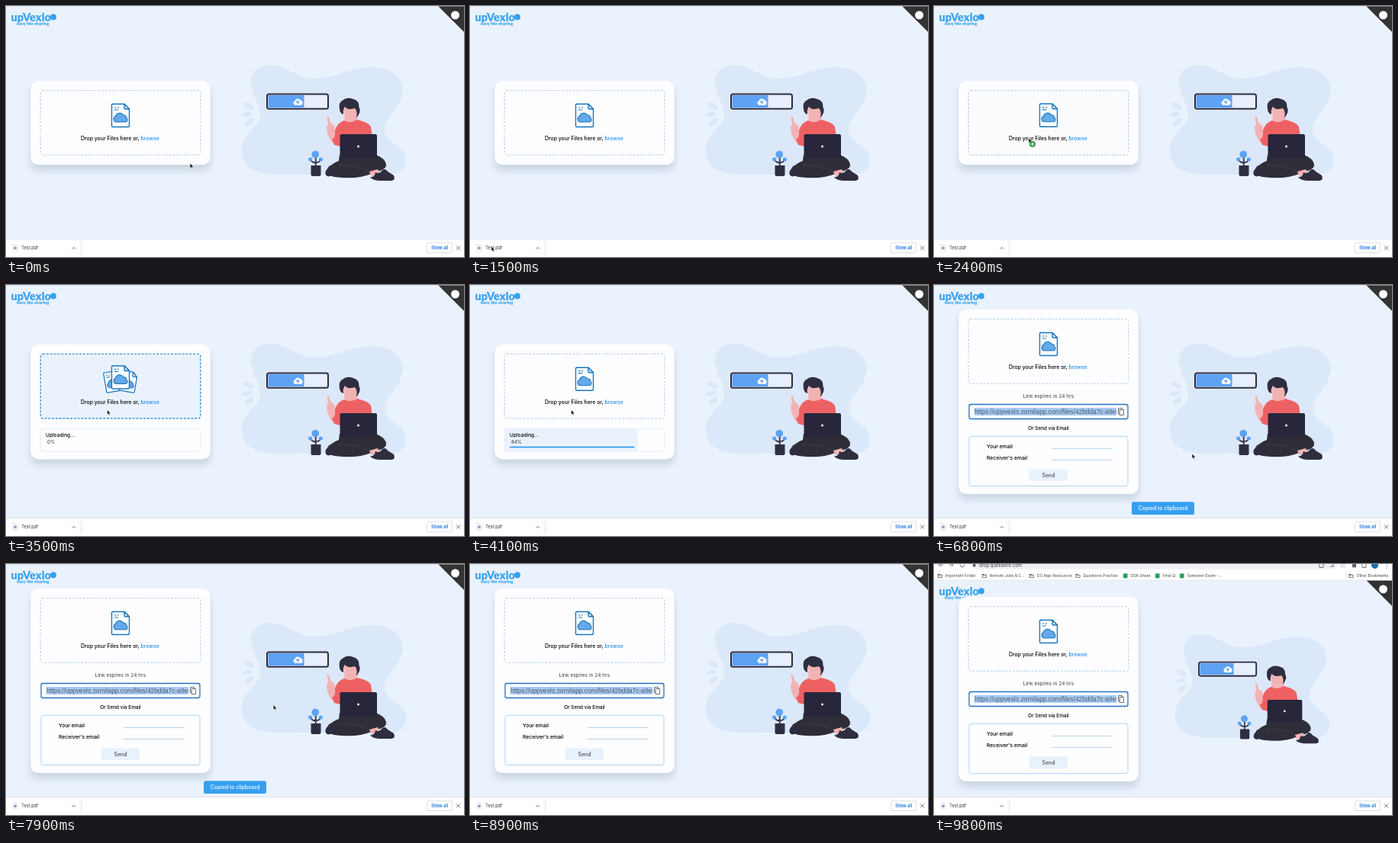
These frames come from a looping animation (600 by 329 pixels, 9.9 s). An HTML page:

```html
<!DOCTYPE html>
<html lang="en">
<head>
<meta charset="utf-8">
<title>File sharing demo</title>
<style>
  html, body { margin: 0; width: 100%; height: 100%; overflow: hidden; background: #eaf2fd; }
  svg { display: block; width: 600px; height: 329px; font: 6.9px Inter, sans-serif; }
  .mid { text-anchor: middle; }
  .strong { font-weight: 500; }
  .line { fill: none; stroke-linecap: round; stroke-linejoin: round; }
  .blue { fill: #1f8fec; }
  .logo { fill: #38a2ee; font-family: Lato, sans-serif; font-weight: 900; }
  .dark { fill: #2f2e41; }
  .skin { fill: #f3b3b4; }
  .pale { fill: #dbe8fa; }
  .arial { font-family: "Liberation Sans", Arial, sans-serif; }
</style>
</head>
<body>
<svg viewBox="0 0 600 329">
  <defs>
    <filter id="shadow" x="-20%" y="-20%" width="140%" height="150%">
      <feDropShadow dx="0" dy="7.500" stdDeviation="4.500" flood-color="#1c2a40" flood-opacity=".14"/>
    </filter>
    <clipPath id="page"><rect width="600" height="305.5"/></clipPath>
    <clipPath id="linkClip"><rect x="50" y="120" width="189.3" height="30"/></clipPath>
    <g id="paper" stroke="#1976c0" stroke-width="1.4" stroke-linejoin="round">
      <path fill="#fff" d="M-11-15H5L11.5-8.5V13.5Q11.500 15 10 15H-10Q-11.500 15-11.500 13.500V-13.500Q-11.500-15-10-15Z"/>
      <path fill="#d8eafb" d="M5-15V-9.500Q5-8.500 6-8.500H11.500Z"/>
      <path fill="none" stroke-width="1.200" d="M-8-10.500H-5.500M-4-10.500H-2M-8-7.500H-3"/>
      <path fill="#64a9e9" stroke-width="1.100" d="M-6 8.500A4 4 0 0 1-6.500 1A5.500 5.500 0 0 1 3.500-.5A4.200 4.200 0 0 1 8 3.500A2.800 2.800 0 0 1 6.500 8.500Z"/>
    </g>
    <g id="folder"><path fill="#5f6368" d="M-3-2.500H-.5L.5-1.500H3V2.500H-3Z"/><path fill="#fff" d="M-2.200-.7H2.200V1.700H-2.200Z"/></g>
  </defs>

  <rect width="600" height="329" fill="#eaf2fd"/>
  <g clip-path="url(#page)">
    <g id="art">
      <path class="pale" d="M321 99C320 86 333 76 347 77C368 78 380 94 402 95C428 96 452 80 480 80C507 80 523 97 519 116C515 137 497 143 496 161C496 182 524 181 524 202C524 217 511 223 490 223L400 221C372 220 350 224 329 217C311 211 306 195 310 181C315 163 332 159 333 143C333 127 322 118 321 99Z"/>
      <g class="pale">
        <ellipse cx="318" cy="131" rx="8" ry="3.500" transform="rotate(28 318 131)"/>
        <ellipse cx="316" cy="142" rx="7" ry="3" transform="rotate(-6 316 142)"/>
        <ellipse cx="319" cy="152" rx="7" ry="3.500" transform="rotate(-38 319 152)"/>
      </g>
      <rect x="342" y="115.500" width="80" height="19.300" rx="2.500" fill="#e6effb" stroke="#2f2e41" stroke-width="2"/>
      <path fill="#5da2f3" d="M343.500 117H390.500V133.300H343.500Z"/>
      <path fill="#fff" d="M379 130A3 3 0 0 1 378.500 124.200A4 4 0 0 1 385.800 123.500A3.300 3.300 0 0 1 386 130Z"/>
      <path class="line" stroke="#5da2f3" stroke-width="1.200" d="M382.300 128.500V124.500M380.700 126L382.300 124.400L383.900 126"/>

      <path class="dark" d="M399.500 209H412.500V221Q412.500 223 410.500 223H401.500Q399.500 223 399.500 221Z"/>
      <path class="line" stroke="#2f2e41" stroke-width="1.800" d="M405.700 210V196M399 201Q400 205 405.700 205.500Q411 205 412.300 201"/>
      <g fill="#5da2f3"><circle cx="405.300" cy="194.500" r="4.800"/><circle cx="398.700" cy="201" r="2.600"/><circle cx="412.300" cy="201" r="2.600"/></g>

      <path class="skin" d="M420.500 146Q422 143 423.500 147L426 154Q431 155 431 161L434 176L427 179Q420 169 420 159L422 154Z"/>
      <path class="skin" d="M443 140H461L459 156H444Z"/>
      <path fill="#ee6163" d="M443 150Q452 155 460 149Q474 152 478 158L481 178L476 199H439L438 184L430 182L427 175Q432 173 431 163Q434 153 443 150Z"/>
      <path class="skin" d="M442.500 134Q443 150 452 151Q461 150 461 136L456 130Z"/>
      <path class="dark" d="M437 136Q435 126 442 123Q447 119 455 122Q463 124 462.500 133Q465 137 462 142Q460 146 459 146Q461 138 457 134Q448 137 443.500 132Q441 137 442 142Q438 141 437 136Z"/>
      <path fill="#2f2e38" d="M437 195H484Q496 199 498 207Q499 213 490 216L478 220Q460 228 430 224Q421 222 422 214Q425 207 436 203Z"/>
      <path class="line" stroke="#44434f" stroke-width=".7" d="M436 209Q458 207 478 218"/>
      <path class="skin" d="M476 217L487 214Q491 218 486 224L478 222Z"/>
      <path class="dark" d="M484 218Q489 221 493 215Q497 212 500 217L508 222Q511 229 504 229H488Q479 228 477 224Q483 225 484 218ZM424 209Q431 212 430 222L422 223.500Q417 222 419 216Z"/>
      <rect x="437.500" y="168" width="48.500" height="31.500" rx="2" fill="#27263a"/>
      <circle cx="461.500" cy="184" r="1.500" fill="#eef2fb"/>
    </g>

    <g id="head">
      <text class="logo" x="6.500" y="19.500" font-size="14.500">upVexlo</text>
      <circle fill="#38a2ee" cx="62" cy="14.500" r="4"/>
      <text class="logo" x="14" y="24.600" font-size="5.900">easy file sharing</text>
      <path fill="#333" d="M566 0H600V34Z"/>
      <circle cx="588.500" cy="12" r="5.500" fill="#fff"/>
    </g>

    <g id="card">
      <rect id="panel" x="32.500" width="235" rx="10" fill="#fefdff" filter="url(#shadow)"/>
      <rect id="zone" x="45.200" y="12.800" width="209.600" height="84.400" rx="3" stroke-dasharray="3 1.800"/>
      <use id="left" href="#paper"/><use id="right" href="#paper"/><use id="front" href="#paper"/>
      <text class="strong" x="98" y="78.300">Drop your Files here or, <tspan class="blue">browse</tspan></text>

      <g id="progress">
        <rect x="45.200" y="110.500" width="209.600" height="30" rx="3" fill="#fefdff" stroke="#e1edfa"/>
        <rect id="tint" x="45.500" y="111" height="29" fill="#eaf3fd"/>
        <text class="strong" x="52" y="121.300" font-size="6.600">Uploading...</text>
        <text id="percent" x="54" y="130.500" font-size="6.200" fill="#333"></text>
        <rect id="bar" class="blue" x="52" y="134" height="1.500" rx=".7"/>
      </g>

      <g id="share">
        <text class="mid" x="150" y="116.300" font-size="6.600" fill="#3c4046">Link expires in 24 hrs</text>
        <rect id="linkBox" x="46" y="124.500" width="208" height="19" rx="2.500"/>
        <rect id="selection" x="53" y="129" width="186" height="10" fill="#a6cbf5"/>
        <text class="arial" x="53" y="136.700" font-size="8.330" fill="#555b63" clip-path="url(#linkClip)">https://uppvexlo.zornilapp.com/files/42bdda7c-a9ed86</text>
        <path class="line" stroke="#4a4f56" stroke-width=".8" d="M243.500 131.500H248.500V138.500H243.500ZM243 136.500H241.500V129.500H246.500V131"/>
        <text class="mid strong" x="150" y="158.200" font-size="6.400">Or Send via Email</text>
        <rect x="46" y="166.300" width="208" height="65.200" rx="3" fill="#fefdff" stroke="#add5f4"/>
        <text class="strong" x="69" y="182.200" font-size="6.800">Your email</text>
        <text class="strong" x="69" y="197.200" font-size="6.800">Receiver's email</text>
        <path stroke="#a6cfee" stroke-width=".8" d="M154 182.500H233.500M154 197.500H233.500"/>
        <rect x="124.500" y="209.500" width="50.500" height="15.500" rx="2" fill="#e9f2fc"/>
        <text class="mid strong" x="150" y="219.700" font-size="7" fill="#48525e">Send</text>
      </g>
    </g>

    <g id="toast">
      <rect x="259" y="284.300" width="82" height="16.700" rx="2.500" fill="#369ff1"/>
      <text class="mid strong" x="300" y="295.200" fill="#fff">Copied to clipboard</text>
    </g>
  </g>

  <path id="topLine" d="M0 .3H600" stroke="#cbd3dd" stroke-width=".6"/>
  <g id="chrome" font-size="5.100" fill="#3c4043">
    <path fill="#fff" d="M0-2H600V21.500H0Z"/>
    <rect x="48" y="-10" width="481" height="17" rx="8" fill="#eff1f4"/>
    <path stroke="#d9dce0" stroke-width=".6" d="M0 21.300H600M540.500 11V19"/>
    <path fill="#5f6368" d="M51 0H54.500V3.500H51ZM548 0H553V4.500H548Z"/>
    <text x="59" y="3.700" font-size="6">drop.quellavint.com</text>
    <g class="line" stroke="#5f6368" stroke-width=".9">
      <path d="M6.500 1H11.500M6.500 1L9 3.500M20.500 1H25.500L23 3.500M34 1Q34.500 4 37 4Q39.500 4 40 1.500M505 0V4.500H510V0M519 4L521 2.500L523 4V0M593 0V.5M593 2.500V3M593 5V5.300M561 0V4.500H566V0"/>
    </g>
    <rect x="532" y="-1" width="7" height="6" fill="#e4e6e9"/>
    <circle cx="577.500" cy="1.500" r="4.500" fill="#1b6fa8"/>
    <g id="marks"></g>
  </g>

  <g>
    <path fill="#fff" d="M0 305.500H600V329H0Z"/>
    <path stroke="#d9dde2" stroke-width=".8" d="M0 305.500H600M98.500 309V326"/>
    <path fill="#f1f3f5" stroke="#d5d8dc" stroke-width=".5" d="M9 313H13L15 315V321H9Z"/>
    <circle cx="12" cy="317.300" r="1.800" fill="#7c9cc8"/>
    <text x="20.300" y="319.400" font-size="5.600" fill="#333">Test.pdf</text>
    <path class="line" stroke="#5f6368" stroke-width=".9" d="M86.800 318.300L88.800 316.300L90.800 318.300M590.300 314.800L594.700 319.200M594.700 314.800L590.300 319.200"/>
    <rect x="551.500" y="310.500" width="33" height="13" rx="1.500" fill="#fff" stroke="#d6dbe3" stroke-width=".8"/>
    <text class="mid" x="568" y="319.200" font-size="5.500" font-weight="600" fill="#1a73e8">Show all</text>
  </g>

  <g id="cursor">
    <path id="arrow" fill="#111" stroke="#fff" stroke-width=".6" d="M0 0V6.500L1.500 5.200L2.600 7.500L3.700 7L2.700 4.800H4.700Z"/>
    <path id="hand" fill="#fff" stroke="#222" stroke-width=".7" d="M-.8 0Q0-.8 .8 0V2.500L4 3.200V6Q3.500 8 1.500 8Q-1 8-2.500 4.500L-.8 5Z"/>
    <g id="badge"><circle cx="5" cy="8" r="4" fill="#2f9e3f"/><path stroke="#fff" stroke-width="1.200" d="M2.800 8H7.200M5 5.800V10.200"/></g>
  </g>
</svg>
<script>
const LOOP = 9900;
const DROP = 3480, SHARED = 4300, COPIED = 6050;
const $ = id => document.getElementById(id);
const set = (id, attrs) => { for (const k in attrs) $(id).setAttribute(k, attrs[k]); };
const show = (id, on) => $(id).style.display = on ? '' : 'none';
const mix = (a, b, p) => a + (b - a) * p;
const ease = p => p * p * (3 - 2 * p);
const ramp = (t, from, to) => Math.min(1, Math.max(0, (t - from) / (to - from)));
const blend = (a, b, p) => `rgb(${a.map((v, i) => Math.round(mix(v, b[i], p)))})`;

// time, x, y of the pointer tip
const route = [
  [0, 241, 206], [100, 241, 206], [400, 226, 222], [700, 226, 222], [1400, 28, 315], [1700, 28, 315],
  [2400, 124, 173], [2800, 132.5, 163.5], [4600, 132.5, 163.5], [5400, 249, 163],
  [6150, 249, 163], [6800, 338, 221], [7700, 338, 221], [8500, 415, -10], [LOOP, 415, -10]
];

function pointerAt(t) {
  const i = route.findIndex(k => k[0] > t), a = route[i - 1], b = route[i];
  const p = ease(ramp(t, a[0], b[0]));
  return [mix(a[1], b[1], p), mix(a[2], b[2], p)];
}

const bookmarks = [
  [8, 'Important Folder'], [66, 'Remote Jobs & C...'], [128, 'DS Algo Resources'], [188.5, 'Questions Practise'],
  [250.5, 'DSA Sheet', 1], [292.5, 'Final Q', 1], [324.5, 'Semester Exam -...', 1], [546.5, 'Other Bookmarks']
];
$('marks').innerHTML = bookmarks.map(([x, label, sheet]) =>
  (sheet ? `<rect x="${x - 2.5}" y="12.5" width="5.5" height="6" fill="#2a9d58"/>` : `<use href="#folder" x="${x}" y="15.5"/>`) +
  `<text x="${x + 7}" y="17.3">${label.replace('&', '&amp;')}</text>`).join('');

function draw(t) {
  const reveal = ease(ramp(t, 9400, 9600));
  const hover = ease(ramp(t, 2360, 2580)) * (1 - ease(ramp(t, DROP, DROP + 220)));
  const shared = t >= SHARED, uploading = t >= DROP && !shared, copied = t >= COPIED;

  const [top, height] = shared ? [32, 242] : uploading ? [77.7, 150.5] : [98, 110];
  set('card', { transform: `translate(0 ${top + 11 * reveal})` });
  set('panel', { height });
  set('zone', {
    fill: blend([254, 253, 255], [232, 242, 253], hover),
    stroke: blend([165, 205, 235], [25, 130, 215], hover),
    'stroke-width': mix(.9, 1.2, hover)
  });
  set('front', { transform: `translate(150 ${45.5 - 2.3 * hover})` });
  for (const [id, side] of [['left', -1], ['right', 1]])
    set(id, { transform: `translate(${150 + side * 10.5 * hover} ${45.5 + 3.5 * hover}) rotate(${side * 10 * hover}) scale(.88)` });

  show('progress', uploading);
  const done = ramp(t, 3600, 4200);
  $('percent').textContent = Math.round(done * 100) + '%';
  set('tint', { width: 209 * done });
  set('bar', { width: 196 * done });

  show('share', shared);
  show('selection', copied);
  set('linkBox', copied
    ? { fill: '#fefdff', stroke: '#2173c4', 'stroke-width': 1.3, 'stroke-dasharray': 'none' }
    : { fill: '#eef6fe', stroke: '#9fcdf0', 'stroke-width': .9, 'stroke-dasharray': '3 1.8' });
  const raised = ease(ramp(t, COPIED, COPIED + 250)) - ease(ramp(t, 8050, 8300));
  set('toast', { transform: `translate(0 ${25 * (1 - raised)})` });

  set('head', { transform: `translate(0 ${21 * reveal})` });
  set('chrome', { transform: `translate(0 ${-22 * (1 - reveal)})` });
  show('chrome', reveal > 0);
  show('topLine', reveal === 0);
  set('art', { transform: `translate(${25.5 * reveal} ${20 * reveal}) scale(${1 - .06 * reveal})` });

  const [x, y] = pointerAt(t), onCopy = t >= 5300 && t < 6250;
  set('cursor', { transform: `translate(${x} ${y})` });
  show('arrow', !onCopy);
  show('hand', onCopy);
  show('badge', t > 2250 && t < DROP);
}

function tick() {
  draw(performance.now() % LOOP);
  requestAnimationFrame(tick);
}
tick();
</script>
</body>
</html>
```
